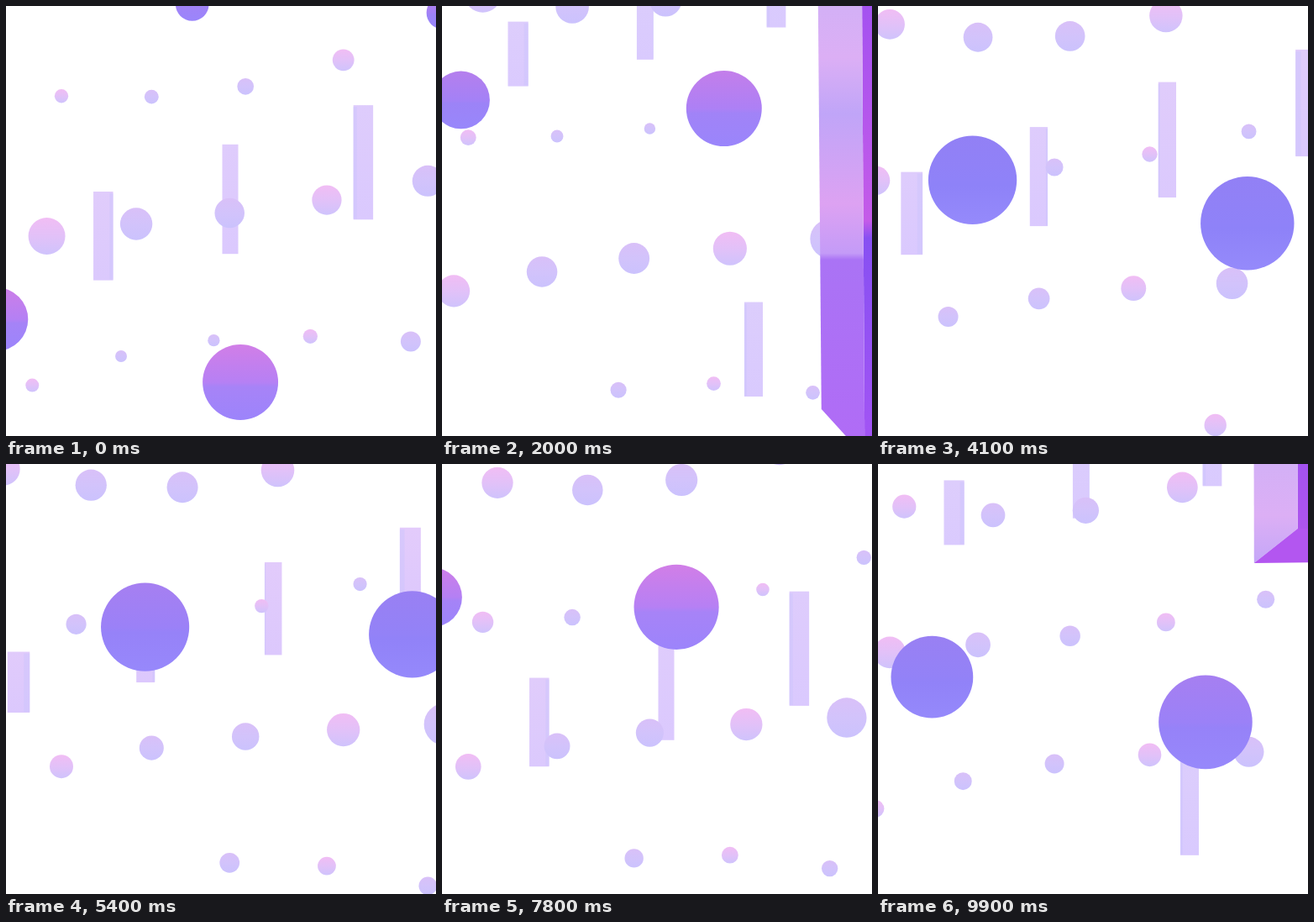
These frames come from a looping animation (512x512 px, 10 s). An HTML page with a canvas:

```html
<!DOCTYPE html>
<html lang="en">
<head>
<meta charset="utf-8">
<title>Floating shapes</title>
<style>
html, body { margin: 0; width: 100%; height: 100%; overflow: hidden; background: #fff; }
canvas { display: block; width: 100vmin; height: 100vmin; }
</style>
</head>
<body>
<canvas id="stage" width="512" height="512"></canvas>
<script>
const ctx = document.getElementById('stage').getContext('2d');
const { sin, cos, min, max, abs, floor, PI } = Math;

const mix = (a, b, p) => `rgb(${a.map((v, i) => Math.round(v + (b[i] - v) * p))})`;

function gradient(top, bottom, stops) {
  const g = ctx.createLinearGradient(0, top, 0, bottom);
  stops.forEach(([at, color]) => g.addColorStop(at, color));
  return g;
}

function circle(x, y, r, stops) {
  ctx.fillStyle = gradient(y - r, y + r, stops);
  ctx.beginPath();
  ctx.arc(x, y, r, 0, 7);
  ctx.fill();
}

function poly(fill, ...points) {
  ctx.fillStyle = fill;
  ctx.beginPath();
  points.forEach(([x, y]) => ctx.lineTo(x, y));
  ctx.fill();
}

// All three layers are slanted lattices: six rows down equal one column across.

function drawBar(row, n, t) {
  const y = 230 + 432 * row - 328 * t - 7.3 * n;
  if (y > 448) return;
  const x = 267 + 25.2 * n + (n > 0 ? .2 * n * n : 0);
  const w = 19 + abs(n) * .75;
  const length = 101 + 17 * cos(2 * PI * n / 3) + 20 * sin((n + 3) / 4.5);
  const top = y - length / 2, side = abs(n) * .7;
  const pink = .5 + .3 * sin(n);
  ctx.fillStyle = gradient(top, top + length, [
    [0, mix([217, 206, 253], [229, 202, 250], pink)],
    [1, mix([216, 203, 254], [221, 199, 253], pink)]
  ]);
  ctx.fillRect(x - w / 2, top, w, length);
  ctx.fillStyle = 'rgba(205,198,253,.5)';
  ctx.fillRect(n < 0 ? x + w / 2 - side : x - w / 2, top + 2, side, length - 3);
}

// Dots lie on a curved wall: the sides are nearer, and a still wave sets the size.
function drawDot(row, col, t) {
  const c = col - row % 6 / 6;
  const x = 66 + 105 * c + 2.3 * c * c;
  const near = 1 + 4.1e-6 * (x - 235) ** 2;
  const flat = 104 + 150.2 * row + 5 * cos((row - 5.7) * .8) - .116 * (x - 235) - 126 * t;
  const y = 256 + near * (flat - 256);
  if (y > 454 + .12 * x) return;
  const r = near * (13 + 6.3 * cos((flat - 278) / 272 * 2 * PI));
  const pink = .45 + .45 * cos(2 * PI * col / 3);
  circle(x, y, r, [
    [0, mix([209, 193, 250], [244, 189, 243], pink)],
    [.5, mix([205, 195, 252], [228, 193, 248], pink)],
    [1, mix([202, 194, 253], [208, 195, 252], pink)]
  ]);
}

function drawBall(row, q, t) {
  const x = 259 + 316 * sin((q - 5.65) / 5.5);
  const bob = 18 * cos(2.5 * row + PI * floor(q / 6));
  const y = 430 + 440 * row - 370 * t + 6.5 * (q - 6) - bob;
  if (abs(y - 285) > 325) return;
  const edge = min(1, .74 + x / 460, 2.42 - x * .003);
  const r = 56 * edge * max(0, cos((y - 285) / 210)) ** .65;
  const pink = .5 + .45 * cos((q - 6) * .967);
  circle(x, y, r, [
    [0, mix([142, 128, 246], [212, 126, 230], pink)],
    [.5, mix([140, 130, 248], [184, 128, 244], pink)],
    [.56, mix([140, 130, 248], [168, 131, 247], pink)],
    [1, mix([148, 138, 251], [156, 132, 251], pink)]
  ]);
}

function drawPillar(t) {
  const bottom = 480 - 517 * (t % 7.2 - 2), top = bottom - 640;
  if (bottom < -60 || top > 600) return;
  const back = y => y + (y - 270) * .27;
  const front = y => [446.5 + max(0, y) * .011, y];
  const fold = y => [498.5 + max(0, y) * .01, back(y)];
  const face = gradient(0, 512, [
    [0, '#d3b0f6'], [.12, '#dcaff5'], [.25, '#c0a5f8'], [.46, '#dda2f2'],
    [.575, '#c49bf7'], [.59, '#aa73f5'], [1, '#b06cf6']
  ]);
  const shade = gradient(0, 512, [
    [0, '#a452f0'], [.5, '#c45be8'], [.54, '#8750f2'], [1, '#a254f4']
  ]);
  poly(shade, fold(top), [530, back(top)], [530, back(bottom)], fold(bottom));
  poly(face, front(top), fold(top), fold(bottom), front(bottom));
  // The end cap shows only when it is turned towards the middle height
  const cap = y => poly('#b356f0', front(y), fold(y), [530, back(y)], [530, y - 1]);
  if (bottom < 270) cap(bottom);
  if (top > 270) cap(top);
}

function draw(now) {
  const t = floor(now / 100) % 100 / 10;
  ctx.fillStyle = '#fff';
  ctx.fillRect(0, 0, 512, 512);
  for (let row = 0; row < 10; row++)
    for (let j = -1; j < 3; j++) drawBar(row, 6 * j - row % 6, t);
  for (let row = 0; row < 12; row++)
    for (let col = 0; col < 5; col++) drawDot(row, col, t);
  drawPillar(t);
  for (let row = -1; row < 10; row++)
    for (let q = -1; q < 12; q++)
      if ((q - row) % 6 === 0) drawBall(row, q, t);
  requestAnimationFrame(draw);
}
requestAnimationFrame(draw);
</script>
</body>
</html>
```
